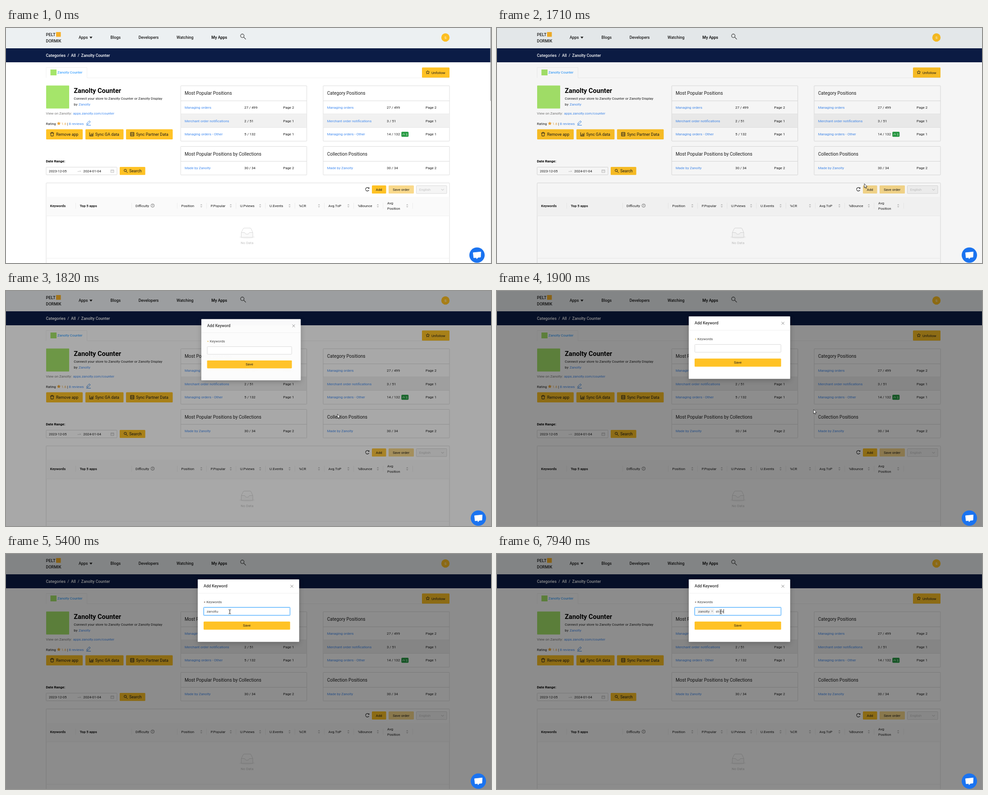
Animation, 1075 px wide and 521 px high, one loop 8 s. Source, as an HTML page with a canvas:

```html
<!DOCTYPE html>
<html lang="en">
<head>
<meta charset="utf-8">
<title>Add keyword</title>
<style>
  html, body { margin: 0; width: 100%; height: 100%; overflow: hidden; background: #fff; }
  canvas { display: block; width: 1075px; height: 521px; }
</style>
</head>
<body>
<canvas id="stage"></canvas>
<script>
const W = 1075, H = 521, LOOP = 8000;
const canvas = document.getElementById('stage');
const ctx = canvas.getContext('2d');
const dpr = window.devicePixelRatio || 1;
canvas.width = W * dpr;
canvas.height = H * dpr;

const SM = 7.84, MD = 8.96, LG = 10.08;
const INK = '#1c1c1c', BLUE = '#428bf0', GOLD = '#ffc225', PALE = '#f9d98c', LINE = '#dcdcdc';
const BRAND = 'Zanolty', APP = BRAND + ' Counter';

// y is the middle of the capital letters
function text(str, x, y, size = SM, color = INK, weight = 400, align = 'left') {
  ctx.font = `${weight} ${size}px Roboto, Arial, sans-serif`;
  ctx.textAlign = align;
  ctx.fillStyle = color;
  ctx.fillText(str, x, y + size * 0.355);
}

function box(x, y, x2, y2, fill, stroke, r = 0) {
  ctx.beginPath();
  ctx.roundRect(x, y, x2 - x, y2 - y, r);
  if (fill) { ctx.fillStyle = fill; ctx.fill(); }
  if (stroke) { ctx.strokeStyle = stroke; ctx.lineWidth = 1; ctx.stroke(); }
}

function path(points, color, width = 1, close = false, fill = null) {
  ctx.beginPath();
  for (let i = 0; i < points.length; i += 2) ctx.lineTo(points[i], points[i + 1]);
  if (close) ctx.closePath();
  if (fill) { ctx.fillStyle = fill; ctx.fill(); }
  if (color) { ctx.strokeStyle = color; ctx.lineWidth = width; ctx.stroke(); }
}

function circle(x, y, r, fill, stroke, width = 1) {
  ctx.beginPath();
  ctx.arc(x, y, r, 0, Math.PI * 2);
  if (fill) { ctx.fillStyle = fill; ctx.fill(); }
  if (stroke) { ctx.strokeStyle = stroke; ctx.lineWidth = width; ctx.stroke(); }
}

const hline = (x, x2, y, color = LINE) => path([x, y, x2, y], color);

function star(x, y, r, fill, stroke) {
  const pts = [];
  for (let i = 0; i < 10; i++) {
    const a = -Math.PI / 2 + i * Math.PI / 5, d = i % 2 ? r * 0.5 : r;
    pts.push(x + Math.cos(a) * d, y + Math.sin(a) * d);
  }
  path(pts, stroke, 0.9, true, fill);
}

function magnifier(x, y, r, color, width) {
  circle(x, y, r, null, color, width);
  path([x + r * 0.75, y + r * 0.75, x + r * 2, y + r * 2], color, width);
}

function mix(a, b, k) {
  const part = (c, i) => parseInt(c.substr(i, 2), 16);
  return 'rgb(' + [1, 3, 5].map(i => Math.round(part(a, i) + (part(b, i) - part(a, i)) * k)) + ')';
}

// keys: rows of [time, value, value...]
function track(keys, t) {
  if (t <= keys[0][0]) return keys[0].slice(1);
  for (let i = 1; i < keys.length; i++) {
    const a = keys[i - 1], b = keys[i];
    if (t <= b[0]) {
      const k = (t - a[0]) / (b[0] - a[0]);
      return a.slice(1).map((v, j) => v + (b[j + 1] - v) * k);
    }
  }
  return keys[keys.length - 1].slice(1);
}

function bezier(x1, y1, x2, y2, k) {
  if (k <= 0) return 0;
  if (k >= 1) return 1;
  const at = (a, b, u) => 3 * a * u * (1 - u) ** 2 + 3 * b * u * u * (1 - u) + u ** 3;
  let lo = 0, hi = 1;
  for (let i = 0; i < 24; i++) {
    const mid = (lo + hi) / 2;
    if (at(x1, x2, mid) < k) lo = mid; else hi = mid;
  }
  return at(y1, y2, lo);
}

function header() {
  box(0, 0, W, 45, '#ecf0f2');
  text('PELT', 88.5, 14.5, 9.4, INK, 500);
  text('DORMIK', 88.5, 29, 9, INK, 500);
  box(111, 9, 121.5, 19.5, '#f5b02a');
  text('Apps', 161, 21, MD, INK, 500);
  path([185, 19.3, 191.6, 19.3, 188.3, 23.6], null, 0, true, INK);
  text('Blogs', 231.5, 21, MD, INK, 500);
  text('Developers', 293.7, 21, MD, INK, 500);
  text('Watching', 378, 21, MD, INK, 500);
  text('My Apps', 455.3, 21, MD, '#000', 500);
  magnifier(523.8, 17.3, 3.9, '#333', 1.1);
  circle(974, 21, 9.2, '#fdbf22');
  text('S', 974, 21.2, SM, '#fff', 400, 'center');

  box(0, 45, W, 76, '#0b1c46');
  [['Categories', 88.5], ['/', 136.3], ['All', 144], ['/', 159], [APP, 166.5]]
    .forEach(([s, x]) => text(s, x, 60.5, MD, '#fff', 500));
}

function goldButton(x, y, x2, y2, label, tx, size = MD, fill = GOLD) {
  box(x, y, x2, y2, fill, null, 1.5);
  text(label, tx, (y + y2) / 2, size, INK);
}

function appInfo() {
  path([89, 110.5, 89, 87.5, 179.5, 87.5, 179.5, 110.5, 983, 110.5], '#f0f0f0');
  box(98.5, 92, 112, 105, '#a5e56a');
  text(APP, 114, 98, SM, '#1890ff');
  goldButton(922, 87.5, 983, 110, 'Unfollow', 943, SM);
  star(934.8, 98.5, 4, null, INK);

  box(89, 127.5, 140, 178.5, '#a5e56a', null, 1);
  text(APP, 150.3, 139, 14.56, '#000', 700);
  text(`Connect your store to ${APP} or ${BRAND} Display`, 150.3, 156.5);
  text('by', 150.3, 169);
  text(BRAND, 161, 169, SM, BLUE);
  text(`View on ${BRAND}:`, 88.5, 189.7, SM, '#777');
  text(`apps.${BRAND.toLowerCase()}.com/counter`, 148.8, 189.7, SM, BLUE);

  text('Rating', 88.5, 212);
  star(117, 211.8, 4.4, '#f0a83a');
  text('1.6', 122.8, 212, SM, '#e8a33d');
  text('|', 135.6, 212);
  text('8 reviews', 139.6, 212, SM, BLUE);
  path([179, 213.5, 179.6, 210.8, 184.8, 205.8, 187, 208, 181.8, 213, 179, 213.5], '#2b7de0', 1, true);
  hline(178, 188, 215.5, '#2b7de0');

  goldButton(89, 224.5, 170, 247, 'Remove app', 111);
  path([98, 233, 106.4, 233], INK);
  path([100.4, 233, 100.4, 231.3, 104, 231.3, 104, 233], INK, 0.9);
  path([99.2, 233, 99.7, 239.5, 104.7, 239.5, 105.2, 233], INK);

  goldButton(176, 224.5, 260.5, 247, 'Sync GA data', 197.7);
  path([185.4, 231.5, 185.4, 239.5, 193.5, 239.5], INK);
  [[187.4, 236], [189.4, 233.5], [191.4, 235], [193, 232.5]]
    .forEach(([x, y]) => path([x, y, x, 238.5], INK));

  goldButton(266, 224.5, 369.5, 247, 'Sync Partner Data', 288.3);
  box(276, 231.5, 283.6, 239.5, null, INK);
  hline(276, 283.6, 234.2, INK);
  hline(276, 283.6, 236.9, INK);

  text('Date Range:', 88.5, 295.5, SM, '#000', 700);
  box(89, 308.5, 246, 325.5, '#fff', '#d9d9d9', 1);
  text('2023-12-05', 95, 317);
  path([158.5, 318, 166, 318, 163.6, 315.8], '#b5b5b5', 0.8);
  text('2024-01-04', 171.3, 317);
  box(232.3, 314.5, 239, 320.5, null, '#bdbdbd');
  hline(232.3, 239, 316.8, '#bdbdbd');
  goldButton(252, 308, 308.7, 325.7, 'Search', 273.3);
  magnifier(264.3, 315.8, 2.6, INK, 1);
}

function card(x, x2, y, title, rows) {
  const bottom = y + 33.5 + rows.length * 29.8;
  box(x, y, x2, bottom, '#fff', LINE, 1);
  text(title, x + 8.7, y + 16.5, LG, INK);
  rows.forEach(([name, rank, page], i) => {
    const top = y + 33.5 + i * 29.8;
    if (i % 2) box(x + 0.5, top, x2 - 0.5, top + 29.8, '#f1f1f1');
    hline(x, x2, Math.round(top) - 0.5, i ? '#e6e6e6' : LINE);
    text(name, x + 8.7, top + 14.6, SM, BLUE);
    text(rank, x + 141, top + 14.6);
    text(page, x + 227, top + 14.6);
  });
}

function cards() {
  const rows = (a, b) => [
    ['Managing orders', '27 / 499', 'Page 2'],
    ['Merchant order notifications', a, 'Page 1'],
    ['Managing orders - Other', b, 'Page 1']
  ];
  const made = [['Made by ' + BRAND, '30 / 34', 'Page 2']];
  card(387.3, 666.7, 128, 'Most Popular Positions', rows('2 / 51', '5 / 132'));
  card(703, 983, 128, 'Category Positions', rows('3 / 51', '14 / 132'));
  card(387.3, 666.7, 262.5, 'Most Popular Positions by Collections', made);
  card(703, 983, 262.5, 'Collection Positions', made);
  box(876.3, 230, 892.3, 241.3, '#2a9d46', null, 2);
  path([879, 237, 881.6, 234.3, 884.2, 237], '#fff', 0.9);
  text('1', 886, 235.8, SM, '#fff');
}

function table(hover) {
  box(89, 343.5, 983, 540, '#fff', LINE, 1);
  ctx.beginPath();
  ctx.arc(801, 357.5, 3.9, 0.5, 5.6);
  ctx.strokeStyle = INK;
  ctx.lineWidth = 1.1;
  ctx.stroke();
  path([805.3, 353, 805.3, 356.2, 802.3, 356.2], null, 0, true, INK);
  goldButton(811, 349, 842.6, 367, 'Add', 819.8, SM, mix(GOLD, PALE, hover));
  goldButton(848, 349, 904, 367, 'Save order', 857.2, SM, PALE);
  box(909.5, 349.5, 977, 367, '#f5f5f5', '#d9d9d9', 1);
  text('English', 915.8, 358, SM, '#c3c3c3');
  path([964.8, 357, 967.6, 360, 970.4, 357], '#bbb');

  box(89.5, 374.5, 982.5, 416, '#fafafa');
  hline(89, 983, 416.5, '#f0f0f0');
  hline(89, 983, 510.5, '#f0f0f0');
  text('Keywords', 97.8, 394, SM, INK, 700);
  text('Top 5 apps', 163.5, 394, SM, INK, 700);
  text('Difficulty', 287, 394);
  circle(325, 393.7, 3.7, null, '#555', 0.8);
  text('?', 325, 393.9, 5.6, '#444', 400, 'center');
  [154.5, 278.5].forEach(x => path([x, 387.5, x, 400.5], '#ececec'));
  ['Position', 'P.Popular', 'U.Pviews', 'U.Events', '%CR', 'Avg.ToP', '%Bounce', '']
    .forEach((name, i) => {
      const x = 379.5 + i * 65.2;
      path([x, 387.5, x, 400.5], '#ececec');
      text(name, x + 9, 394);
      const s = x + 53.4;
      path([s - 2.4, 392.9, s + 2.4, 392.9, s, 390.2], null, 0, true, '#bfbfbf');
      path([s - 2.4, 395.2, s + 2.4, 395.2, s, 397.9], null, 0, true, '#bfbfbf');
    });
  path([901.5, 387.5, 901.5, 400.5], '#ececec');
  text('Avg', 845, 387.8);
  text('Position', 845, 400);

  ctx.beginPath();
  ctx.ellipse(534.3, 463.5, 17, 3.6, 0, 0, Math.PI * 2);
  ctx.fillStyle = '#f5f5f5';
  ctx.fill();
  path([521.5, 453.5, 526, 444.5, 528, 443.5, 541, 443.5, 543, 444.5, 547, 453.5], '#d9d9d9', 1, false, '#fff');
  path([521.5, 453.5, 529, 453.5, 531.5, 457, 537, 457, 539.5, 453.5, 547, 453.5,
    547, 464, 521.5, 464], '#d9d9d9', 1, true, '#fafafa');
  text('No Data', 534.3, 476, SM, '#c2c2c2', 400, 'center');
}

const TYPED = [[0, ''], [3600, 'z'], [3670, 'za'], [4020, 'zan'], [4080, 'zano'], [4410, 'zanol'],
  [4740, 'zanolt'], [4870, 'zanoltu'], [5730, 'zanolt'], [6200, 'zanolty'], [6330, ''],
  [7210, 's'], [7600, 'st'], [7800, 'sto'], [7870, 'stor'], [7940, 'store']];
const CARET = [[2770, 3270], [3600, 5400], [5930, 6730], [7340, LOOP]];

function dialog(t) {
  const k = bezier(0.08, 0.82, 0.17, 1, (t - 1715) / 180);
  if (!k) return;
  const s = 0.2 + 0.8 * k, ox = 828, oy = 362;
  ctx.save();
  ctx.globalAlpha = k;
  ctx.translate(ox, oy);
  ctx.scale(s, s);
  ctx.translate(-ox, -oy);

  ctx.shadowColor = 'rgba(0,0,0,0.22)';
  ctx.shadowBlur = 12;
  ctx.shadowOffsetY = 3;
  box(425, 56.3, 649.8, 194.7, '#fff', null, 1);
  ctx.shadowColor = 'transparent';

  text('Add Keyword', 438, 71.3, MD, '#333', 500);
  path([630.7, 68.5, 636.7, 74.5], '#777', 0.9);
  path([636.7, 68.5, 630.7, 74.5], '#777', 0.9);
  hline(425, 649.8, 87, '#eee');
  text('*', 438.4, 107.3, SM, t < 2600 ? '#d8b040' : '#6b4a3a');
  text('Keywords', 444.3, 106.5, SM, '#444');

  const focus = Math.min(1, Math.max(0, (t - 2770) / 240));
  if (focus) {
    ctx.globalAlpha = k * focus;
    box(437, 117, 630.6, 137.3, '#c4e3ff', null, 2);
    ctx.globalAlpha = k;
  }
  box(438.5, 118.5, 629.3, 135.8, '#fff', mix('#d9d9d9', '#40a9ff', focus), 1);
  goldButton(438, 149.7, 629.7, 167.7, '', 0);
  text('Save', 533.7, 158.3, SM, INK, 400, 'center');

  const chip = t >= 6330, x = chip ? 484.8 : 444.7;
  if (chip) {
    box(442.5, 120.5, 482, 133.5, '#f4f4f4', null, 1);
    text('zanolty', 446, 127, SM, '#444');
    path([475, 125, 478.8, 128.8], '#999', 0.8);
    path([478.8, 125, 475, 128.8], '#999', 0.8);
  }
  const typed = TYPED.filter(e => e[0] <= t).pop()[1];
  text(typed, x, 127.5, SM, '#4a4a4a');
  if (CARET.some(([on, off]) => t >= on && t < off)) {
    box(Math.floor(x + ctx.measureText(typed).width + 0.3), 122, Math.floor(x + ctx.measureText(typed).width + 0.3) + 0.9, 132, '#333');
  }
  ctx.restore();
}

function chat(x) {
  circle(x, 503.5, 17, '#1a73f0');
  path([x - 8.6, 498, x + 8.6, 496.3, x + 8, 508, x + 2.4, 508.7, x - 0.8, 512, x - 1.2, 509, x - 7.4, 509.4],
    '#fff', 0.8, true, '#fff');
}

const POINTER = [[40, 1040, 528], [70, 1037, 514], [300, 985, 455], [600, 915, 386], [870, 877, 356],
  [1100, 845, 358], [1350, 828, 362], [1620, 828, 362], [1665, 824, 357], [1710, 815, 346],
  [1760, 773, 304], [1820, 735, 273], [1900, 702, 263], [2200, 612, 212], [2560, 512, 141], [2700, 496, 128]];

function pointer(t) {
  if (t < 70) return;
  const [x, y] = track(POINTER, t);
  if (t > 2600) {
    path([x - 2.6, y - 4.6, x - 0.6, y - 4.3, x, y - 3.6, x + 0.6, y - 4.3, x + 2.6, y - 4.6], '#222', 0.9);
    path([x - 2.6, y + 4.8, x - 0.6, y + 4.5, x, y + 3.8, x + 0.6, y + 4.5, x + 2.6, y + 4.8], '#222', 0.9);
    path([x, y - 4, x, y + 4.2], '#222', 1.1);
    return;
  }
  const shape = [0, 0, 0, 9.2, 2.1, 7.3, 3.5, 10.5, 5, 9.9, 3.6, 6.8, 6.4, 6.6];
  path(shape.map((v, i) => v + (i % 2 ? y : x)), '#222', 0.9, true, '#fff');
}

const MASK = [[1695, 0], [1710, 0.035], [1760, 0.19], [1820, 0.34], [1900, 0.445], [1940, 0.45]];
const HOVER = [[1130, 0], [1350, 1], [1755, 1], [1840, 0]];

function draw(t) {
  const locked = t >= 1690;
  ctx.setTransform(dpr, 0, 0, dpr, 0, 0);
  box(0, 0, W, H, '#fff');
  header();
  appInfo();
  cards();
  table(track(HOVER, t)[0]);
  if (!locked) {
    box(1073.6, 0, W, H, '#f1f1f1');
    box(1073.8, 0, W, 161.5, '#9a9a9a');
  }
  const [mask] = track(MASK, t);
  if (mask) box(0, 0, W, H, `rgba(0,0,0,${mask})`);
  dialog(t);
  chat(locked ? 1047 : 1044);
  pointer(t);
}

const start = performance.now();
function tick() {
  draw((performance.now() - start) % LOOP);
  requestAnimationFrame(tick);
}
tick();
</script>
</body>
</html>
```
